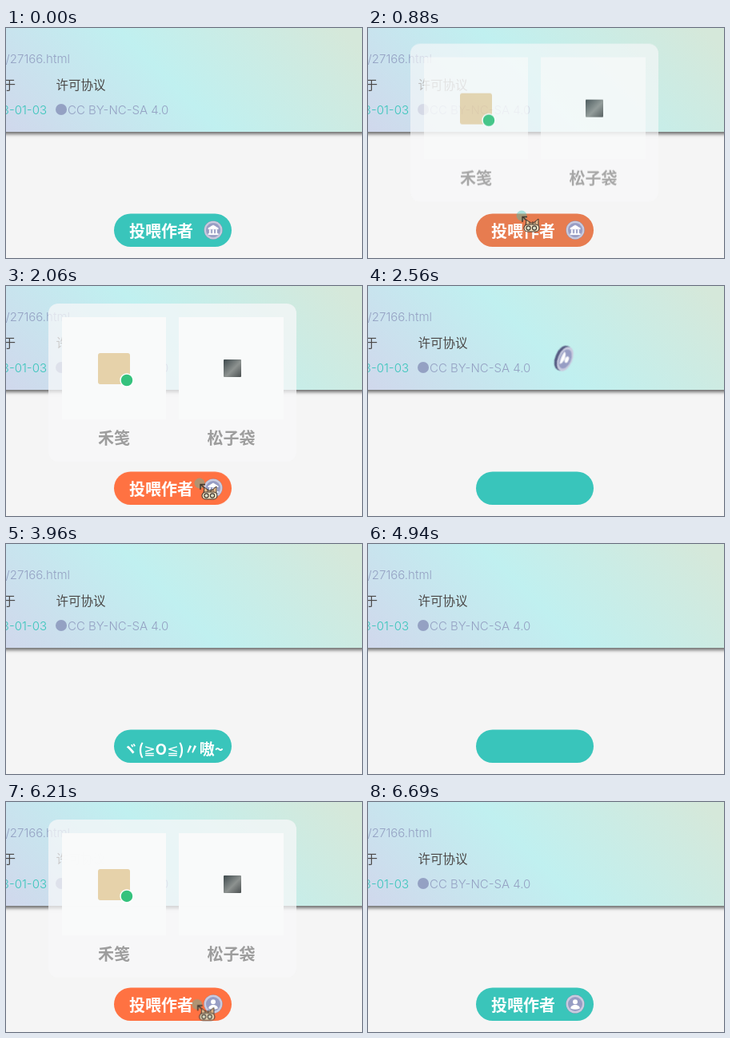
Write an HTML page that moves like this. It is 445 px wide and 288 px high and loops after 7240 ms.

```html
<!DOCTYPE html>
<html lang="zh-CN">
<head>
<meta charset="utf-8">
<title>投喂作者</title>
<style>
  html, body { margin: 0; width: 100%; height: 100%; overflow: hidden; background: #f5f5f5; }
  #stage { position: relative; width: 445px; height: 288px; overflow: hidden; }
  #card {
    position: absolute; left: -10px; right: -10px; top: -10px; height: 140px;
    background: linear-gradient(45deg, #d0d8ec 2%, #c0f0f0 46%, #d5e8da 92%);
    box-shadow: 0 2px 4px 1px rgba(0, 0, 0, .55);
  }
  svg { position: absolute; inset: 0; width: 445px; height: 288px; }
  text { font: 300 15.5px "Noto Sans CJK SC", "Noto Sans CJK", "Noto Sans", sans-serif; white-space: pre; }
  .latin { font: 300 15px Inter, "Noto Sans", sans-serif; }
  .end { text-anchor: end; }
  .mid { text-anchor: middle; }
  .bold { font-size: 20px; font-weight: 700; }
  .face { font-size: 19px; }
  .math { font: 400 17px "DejaVu Sans", sans-serif; }
  .muted { fill: #94a1c3; }
  .teal { fill: #39c5bb; }
  .ink { fill: #4c4948; }
  #button { transform-origin: 208.5px 253px; }
</style>
</head>
<body>
<div id="stage">
  <div id="card"></div>
  <svg viewBox="0 0 445 288">
    <defs>
      <clipPath id="slot">
        <path d="M0 0H445V253H282a21 21 0 0 1-21 21H156a21 21 0 0 1-21-21H0Z"/>
      </clipPath>
      <linearGradient id="photo" x2="1" y2="1">
        <stop stop-color="#3d484b"/><stop offset=".55" stop-color="#8d9290"/><stop offset="1" stop-color="#4a4f50"/>
      </linearGradient>
      <g id="disc">
        <circle r="11.5" fill="#c9cbdf"/>
        <circle r="9" fill="#979dc4"/>
      </g>
    </defs>

    <text class="latin muted end" x="80" y="44">posts/27166.html</text>
    <text class="ink end" x="12" y="77">发布于</text>
    <text class="ink" x="62.5" y="77">许可协议</text>
    <text class="latin teal end" x="51" y="108">2023-01-03</text>
    <circle cx="69" cy="102" r="7" fill="#94a1c3"/>
    <text class="latin muted" x="77" y="108">CC BY-NC-SA 4.0</text>

    <g id="popup">
      <rect x="53" y="22" width="310" height="198" rx="12" fill="#f7f7f8" fill-opacity=".75"/>
      <path d="M70 39h130v128H70zM216 39h131v128H216z" fill="#f9fafa"/>
      <rect x="115" y="84" width="40" height="39" rx="3" fill="#e6d2aa"/>
      <circle cx="151" cy="118" r="8" fill="#35c27d" stroke="#fff" stroke-width="1.5"/>
      <rect x="272" y="92" width="22" height="22" rx="1" fill="url(#photo)"/>
      <g fill="#9d9d9d">
        <text class="bold mid" x="135" y="198">禾笺</text>
        <text class="bold mid" x="281.5" y="198">松子袋</text>
      </g>
    </g>

    <g id="button">
      <rect id="pill" x="135" y="232.5" width="147" height="41.5" rx="20.75" fill="#39c5bb"/>
      <text id="label" class="bold" x="154" y="261.5" fill="#fff">投喂作者</text>
      <text id="thanks" class="bold face mid" x="209" y="264" fill="#fff">ヾ(<tspan class="math">≧</tspan>O<tspan class="math">≦</tspan>)〃嗷~</text>
    </g>

    <g clip-path="url(#slot)">
      <g id="coin">
        <circle id="rim" r="11.5" fill="#555b82"/>
        <rect id="edge" x="-11.5" y="-2" width="23" height="4" fill="#555b82"/>
        <g id="front">
          <use href="#disc"/>
          <path d="M-6.5-2.5 0-6.5 6.5-2.5V-1H-6.5ZM-5-.5h2V4h-2zM-1-.5h2V4h-2zM3-.5h2V4H3zM-6.5 4h13v2h-13z" fill="#fff"/>
        </g>
        <g id="back">
          <use href="#disc"/>
          <circle cy="-2.8" r="3" fill="#fff"/>
          <path d="M-5.8 5.5c0-6 11.6-6 11.6 0Q0 8-5.8 5.5Z" fill="#fff"/>
        </g>
      </g>
    </g>

    <g id="cursor">
      <circle cx="-12" cy="-11" r="6.5" fill="#39c5bb" fill-opacity=".4"/>
      <path d="M-11-3v-6.5h6M-10-9l5 5" fill="none" stroke="#40362f" stroke-width="1.4"/>
      <path d="M-7 2-6-6-1-2H3L9-7 9 2Z" fill="#e3b98c" stroke="#40362f"/>
      <path d="M-2-4v4M2-4v4M5-4v3" stroke="#40362f" stroke-width=".8"/>
      <rect x="-9" y="0" width="19" height="9" rx="4.5" fill="#efdfbd" stroke="#40362f" stroke-width="1.1"/>
      <g fill="#d8dcc4" stroke="#40362f" stroke-width="1.1">
        <circle cx="-3.5" cy="4.5" r="2.6"/><circle cx="4" cy="4.5" r="2.6"/>
      </g>
    </g>
  </svg>
</div>
<script>
const LOOP = 7240;
const TEAL = '#39c5bb', ORANGE = '#ff7242';
const hovers = [
  { enter: 703, open: 703, leave: 1220 },
  { enter: 1548, open: 1610, leave: 2150 },
  { enter: 5880, open: 5930, leave: 6420 },
];
const flight = { start: 2080, end: 3580, back: 5510 };
const byId = id => document.getElementById(id);
const began = document.timeline.currentTime;

// steps: [ms, style, easing to the next step]
function play(id, steps) {
  const first = [0, steps[0][1]], last = [LOOP, steps[steps.length - 1][1]];
  const frames = [first, ...steps, last].map(([ms, style, easing = 'linear']) =>
    ({ offset: ms / LOOP, easing, ...style }));
  byId(id).animate(frames, { duration: LOOP, iterations: Infinity }).startTime = began;
}

const fade = (id, steps) => play(id, steps.map(([ms, opacity]) => [ms, { opacity }]));

play('pill', hovers.flatMap(({ enter, leave }) => [
  [enter, { fill: TEAL }, 'ease'], [enter + 300, { fill: ORANGE }],
  [leave, { fill: ORANGE }, 'ease'], [leave + 300, { fill: TEAL }],
]));

const raised = { opacity: 0, transform: 'translateY(-20px)' };
const settled = { opacity: 1, transform: 'translateY(0px)' };
play('popup', hovers.flatMap(({ open, leave }) => [
  [open, raised, 'ease'], [open + 300, settled], [leave, settled], [leave, raised],
]));

const pose = (y, turn) => ({ transform: `translateY(${y}px) rotate(${turn}deg)` });
play('button', [
  [2060, pose(0, 0), 'ease-out'], [2150, pose(1, 4), 'ease-in-out'], [2320, pose(0, 0)],
  [3500, pose(0, 0), 'ease-out'], [3560, pose(5, 0), 'ease-in-out'], [3660, pose(0, 0)],
]);

fade('label', [[2090, 1], [2190, 0], [5510, 0], [5510, .6], [5580, 1]]);
fade('thanks', [[3580, 0], [3660, 1], [4940, 1], [4940, 0]]);

// The toss rises fast, hangs, drops fast, and ends on the other face.
function toss(p) {
  const lift = 1 - (2 * p - 1) ** 4;
  const angle = 5 * Math.PI * (1 - (p - 1) ** 2);
  return {
    x: 259 - 44 * p, y: 253 - 165 * lift + 40 * p ** 10,
    turn: 350 * p, scale: 1 + .4 * lift,
    cos: Math.cos(angle), sin: Math.sin(angle),
  };
}

const coinParts = {
  coin: c => `translate(${c.x}px, ${c.y}px) rotate(${c.turn}deg) scale(${c.scale})`,
  rim: c => `translateY(${1.6 * Math.abs(c.sin)}px) scaleY(${Math.abs(c.cos)})`,
  edge: c => `scaleY(${.8 * Math.abs(c.sin)})`,
  front: c => `translateY(${-1.6 * Math.abs(c.sin)}px) scaleY(${Math.max(c.cos, 0)})`,
  back: c => `translateY(${-1.6 * Math.abs(c.sin)}px) scaleY(${Math.max(-c.cos, 0)})`,
};
const SAMPLES = 90;
const rested = { x: 259, y: 253, turn: 0, scale: 1, cos: -1, sin: 0 };
for (const [id, shape] of Object.entries(coinParts)) {
  const steps = Array.from({ length: SAMPLES + 1 }, (_, i) => {
    const p = i / SAMPLES;
    return [flight.start + p * (flight.end - flight.start), { transform: shape(toss(p)) }];
  });
  steps[SAMPLES].push('step-end');
  play(id, [...steps, [flight.back - 100, { transform: shape(rested) }]]);
}
fade('coin', [[flight.end, 1], [flight.end, 0], [flight.back, 0], [flight.back, .6], [flight.back + 70, 1]]);

const path = [
  [690, 188, 258], [880, 204, 246], [1220, 232, 236], [1400, 242, 235], [1650, 244, 243],
  [2080, 254, 258], [2150, 275, 262], [2330, 352, 270],
  [5720, 262, 300], [5930, 245, 275], [6180, 250, 264], [6420, 272, 277], [6660, 345, 296],
];
play('cursor', path.map(([ms, x, y]) => [ms, { transform: `translate(${x}px, ${y}px)` }, 'ease-in-out']));
fade('cursor', [
  [690, 0], [690, 1], [2330, 1], [2330, 0], [5720, 0], [5720, 1], [6660, 1], [6660, 0],
]);
</script>
</body>
</html>
```
